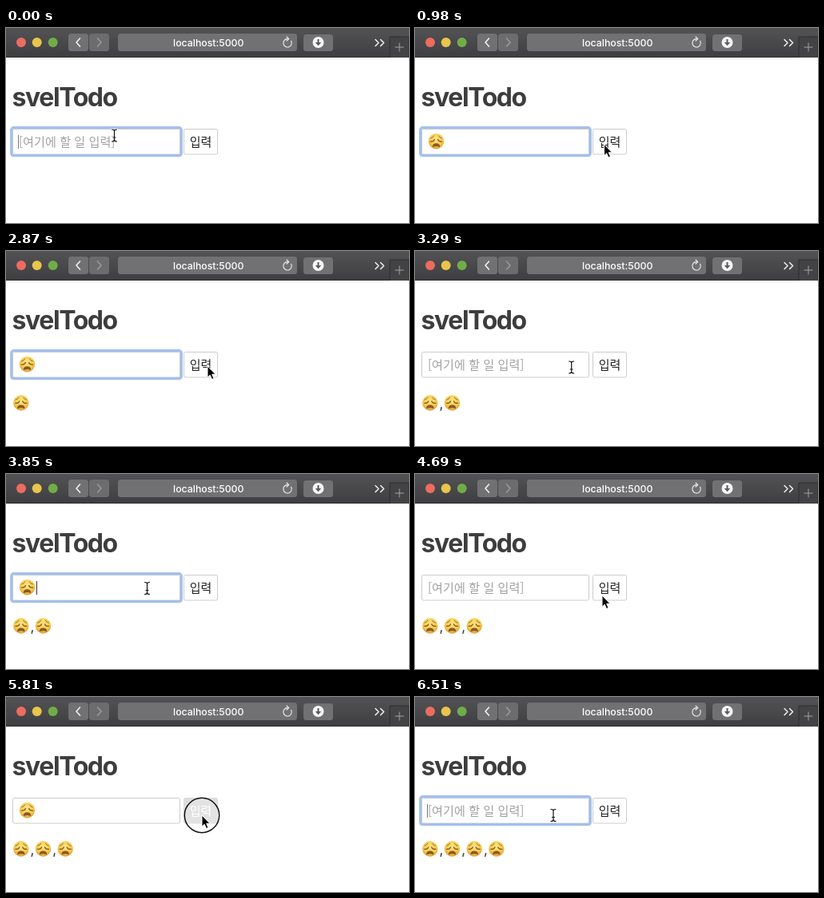
An HTML page for the animation above (6580 ms loop, 504 by 244 pixels).

```html
<!DOCTYPE html>
<html lang="ko">
<head>
<meta charset="utf-8">
<title>svelTodo</title>
<style>
  html, body { margin: 0; width: 100%; height: 100%; overflow: hidden; background: #fff; }
  svg { display: block; width: 504px; height: 244px; }
  .ui { font-family: Inter, Roboto, sans-serif; }
  .ko { font-family: "Noto Sans CJK KR", "Noto Sans CJK JP", "Noto Sans CJK", sans-serif; }
  .line { fill: none; stroke-linecap: round; stroke-linejoin: round; }
  #button.pressed rect { fill: #dedede; stroke: #dadada; }
  #button.pressed text { fill: #fff; }
</style>
</head>
<body>
<svg viewBox="0 0 504 244">
  <defs>
    <linearGradient id="bar" x2="0" y2="1">
      <stop stop-color="#535355"/><stop offset="1" stop-color="#3e3e40"/>
    </linearGradient>
    <radialGradient id="skin" cx=".5" cy=".36" r=".66">
      <stop stop-color="#fde782"/><stop offset=".6" stop-color="#f7cb50"/><stop offset="1" stop-color="#dc9a35"/>
    </radialGradient>
    <g id="weary">
      <circle r="9.7" fill="url(#skin)"/>
      <g class="line" stroke="#80511f">
        <path d="M-6.8-3.8Q-4-4.4-2.8-6.8M6.800-3.800Q4-4.400 2.800-6.800" stroke-width=".8"/>
        <path d="M-7 .4Q-3.200.800-2-2.100M7 .4Q3.200.800 2-2.100" stroke-width="1.2"/>
      </g>
      <path d="M-4.800 6.800Q-4.200 2.600 0 2.600T4.800 6.800Q4.500 7.500 3.600 7Q0 5.600-3.600 7Q-4.500 7.500-4.800 6.800Z" fill="#8a5826"/>
    </g>
    <path id="ibeam" d="M-3-7.500Q0-7.500 0-5.500V5.500Q0 7.500-3 7.500M3-7.500Q0-7.500 0-5.500M0 5.500Q0 7.500 3 7.500M-1.500 2.500h3"/>
  </defs>

  <rect width="504" height="244" fill="#fff"/>

  <g id="toolbar" class="ui">
    <rect width="504" height="37" fill="url(#bar)"/>
    <rect y="36" width="504" height="1" fill="#2f2f31"/>
    <circle cx="19" cy="18" r="6" fill="#ec6c60"/>
    <circle cx="38.700" cy="18" r="6" fill="#e8c64c"/>
    <circle cx="58.700" cy="18" r="6" fill="#72ac49"/>
    <g fill="#717173">
      <rect x="78" y="7" width="25" height="22" rx="3.500"/>
      <rect x="104" y="7" width="25" height="22" rx="3.500" fill="#6c6c6e"/>
      <rect x="140" y="7" width="224" height="22" rx="3.500"/>
      <rect x="372" y="8" width="37" height="21" rx="3.500"/>
    </g>
    <g class="line" stroke="#f2f2f2" stroke-width="1.6">
      <path d="M92.500 13l-4.500 5 4.500 5"/>
      <path d="M114.500 13l4.500 5-4.500 5" stroke="#98989a"/>
      <path d="M356.600 16.300A5.200 5.200 0 1 1 352 13.600M351 11l2.800 2.600-2.800 2.600" stroke-width="1.100"/>
      <path d="M462 14.500l4 4-4 4M468.500 14.500l4 4-4 4" stroke-width="1.500"/>
    </g>
    <circle cx="390.500" cy="18" r="7" fill="#f5f5f5"/>
    <path d="M389.500 14h2v4h2.700l-3.700 4.200-3.700-4.200h2.700z" fill="#5b5b5d"/>
    <text x="253.300" y="22.700" font-size="12.3" font-weight="500" text-anchor="middle" fill="#fff">localhost:5000</text>
    <path d="M480 37V11H504V37" fill="#434345" stroke="#2f2f31"/>
    <path d="M492 18.500v11M486.500 24h11" stroke="#a2a2a4"/>
  </g>

  <text class="ui" x="7.500" y="98" font-size="32" font-weight="700" letter-spacing="-1.4" fill="#3d3d3d">svelTodo</text>

  <g id="field">
    <rect x="8.500" y="126.500" width="209" height="31.500" rx="2" fill="#fff" stroke="#ccc"/>
    <rect id="ring" x="6.700" y="124.700" width="212.600" height="35" rx="3" fill="none" stroke="#a3c0ec" stroke-width="3.2"/>
    <text id="placeholder" class="ko" x="16" y="147.800" font-size="15.15" fill="#a2a2a2">[여기에 할 일 입력]</text>
    <use id="typed" href="#weary" x="26.500" y="141.700"/>
    <rect id="caret" y="134" width="1" height="17"/>
  </g>

  <g id="button">
    <rect x="222.500" y="126.500" width="42" height="31.500" rx="2" fill="#fff" stroke="#ccc"/>
    <text class="ko" x="243.500" y="147.800" font-size="15" text-anchor="middle" fill="#222">입력</text>
  </g>

  <g id="list" class="ui" font-size="17" fill="#333"></g>

  <g id="pointer">
    <circle id="click" r="21.700" fill="#fff" fill-opacity=".15" stroke="#111" stroke-width="1.5"/>
    <path id="arrow" d="M0 0V14.300L3.200 11.300 5.500 16.600 8 15.500 5.700 10.300H10Z" fill="#000" stroke="#fff"/>
    <g id="beam" class="line">
      <use href="#ibeam" stroke="#fff" stroke-width="2.600"/>
      <use href="#ibeam" stroke="#111" stroke-width="1.200"/>
    </g>
  </g>
</svg>

<script>
  const LOOP = 6580, STEP = 70, CARET_ON = 490;

  // Pointer stops: time, x, y
  const path = [
    [490, 135.5, 134.5], [1050, 241, 146],
    [1680, 241, 146], [1750, 234, 143], [2030, 174, 147],
    [2380, 174, 147], [2870, 252, 144],
    [3010, 252, 144], [3430, 176, 146],
    [3780, 176, 146], [3850, 176.5, 143], [4340, 254, 149],
    [4620, 254, 149], [4690, 234, 152], [4900, 171, 148],
    [5320, 171, 148], [5600, 245, 148],
    [6020, 245, 148], [6300, 173, 148]
  ];

  // One entry per added item; the click on the field lasts from focus to focused
  const rounds = [
    { focus: -140, focused: 0, type: 490, press: 1330, release: 1400 },
    { focus: 2030, focused: 2100, type: 2380, press: 2940, release: 3010 },
    { focus: 3570, focused: 3710, type: 3850, press: 4410, release: 4480 },
    { focus: 5040, focused: 5110, type: 5390, press: 5740, release: 5880 },
    { focus: 6440, focused: 6510, type: LOOP, press: LOOP, release: LOOP }
  ];

  const el = id => document.getElementById(id);
  const show = (id, on) => { el(id).style.display = on ? "" : "none"; };
  const within = (t, from, to) => t >= from && t < to;

  el("list").innerHTML = [0, 1, 2, 3].map(i => {
    const x = 18.8 + 27.7 * i;
    return `<g>${i ? `<text x="${x - 16}" y="196.700">,</text>` : ""}<use href="#weary" x="${x}" y="190"/></g>`;
  }).join("");
  const items = [...el("list").children];

  function pointerAt(t) {
    const next = path.findIndex(stop => stop[0] > t);
    if (next === 0) return path[0].slice(1);
    if (next < 0) return path[path.length - 1].slice(1);
    const [t0, x0, y0] = path[next - 1], [t1, x1, y1] = path[next];
    const u = (t - t0) / (t1 - t0), k = u * u * (3 - 2 * u);
    return [x0 + (x1 - x0) * k, y0 + (y1 - y0) * k];
  }

  function draw(t) {
    const [x, y] = pointerAt(t);
    const focused = rounds.some(r => within(t, r.focus, r.press));
    const typing = rounds.find(r => within(t, r.type, r.release));
    const pressing = rounds.some(r => within(t, r.press, r.release));
    const count = rounds.filter(r => t >= r.release).length;
    const overField = x > 8 && x < 218;

    show("ring", focused);
    show("placeholder", !typing);
    show("typed", typing);
    show("caret", focused && (!typing || t - typing.type < CARET_ON));
    el("caret").setAttribute("x", typing ? 38 : 15);
    el("caret").setAttribute("fill", typing ? "#333" : "#777");
    el("button").classList.toggle("pressed", pressing);
    items.forEach((item, i) => { item.style.display = i < count ? "" : "none"; });

    el("pointer").setAttribute("transform", `translate(${x} ${y})`);
    show("click", pressing || rounds.some(r => within(t, r.focus, r.focused)));
    show("beam", overField);
    show("arrow", !overField);
  }

  const start = performance.now();
  function tick() {
    const t = (performance.now() - start) % LOOP;
    draw(Math.floor(t / STEP) * STEP);
    requestAnimationFrame(tick);
  }
  tick();
</script>
</body>
</html>
```
